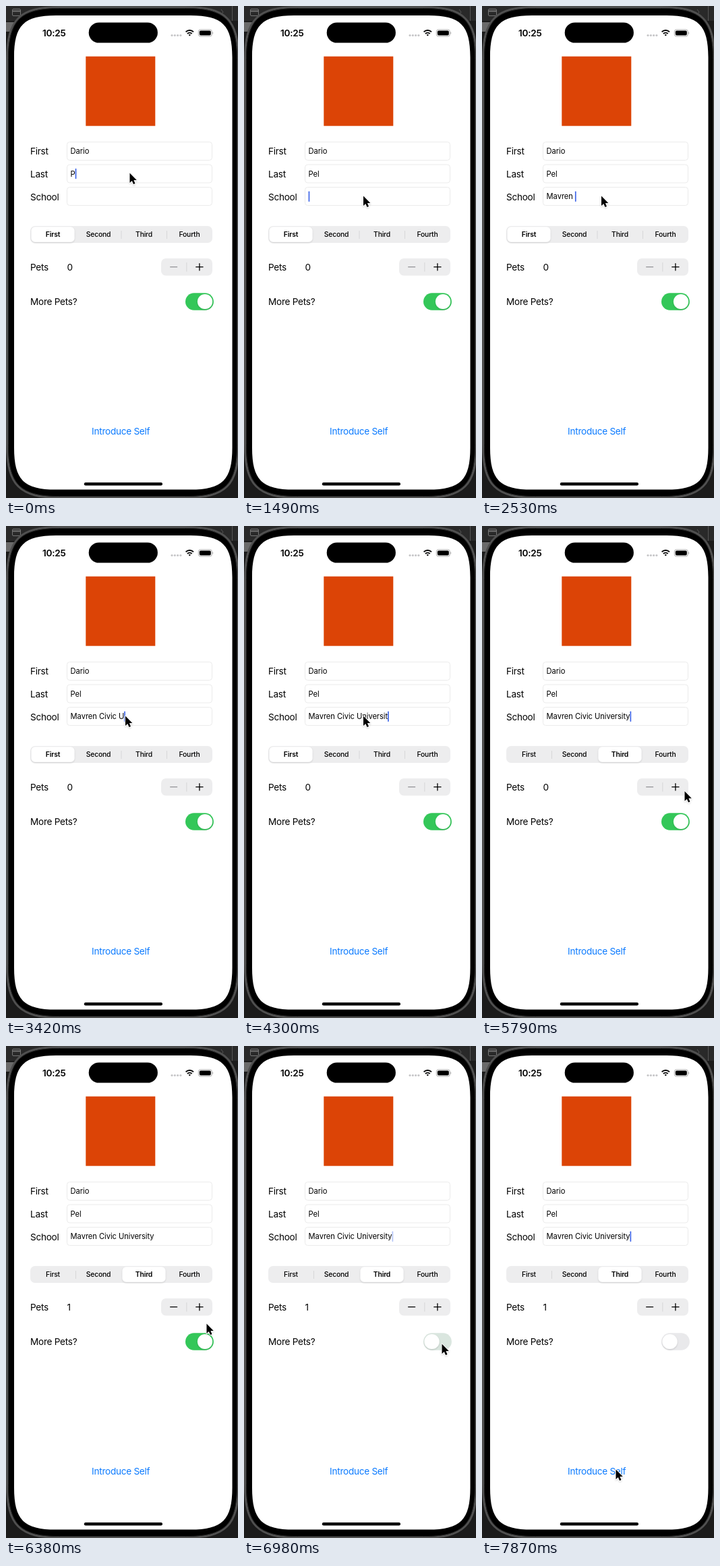
An HTML page for the animation above (8000 ms loop, 344 by 729 pixels).

```html
<!DOCTYPE html>
<html lang="en">
<head>
<meta charset="utf-8">
<title>Form demo</title>
<style>
html, body { margin: 0; width: 100%; height: 100%; overflow: hidden; background: #1b1b1b; }
svg { display: block; font-family: Inter, Roboto, sans-serif; }
text { white-space: pre; letter-spacing: -.02em; fill: #000; }
.label { font-size: 13.6px; }
.field { font-size: 11.15px; letter-spacing: -.004em; }
.seg { font-size: 10.4px; font-weight: 500; text-anchor: middle; }
.seg.on { font-weight: 600; }
.box { fill: #fff; stroke: #ebebeb; stroke-width: 1; }
.tray { fill: #ededee; }
.rule { stroke: #d6d6d8; stroke-width: 1; }
.sign { stroke: #000; stroke-width: 1.3; stroke-linecap: round; }
</style>
</head>
<body>
<svg width="344" height="729" viewBox="0 0 344 729">
  <defs>
    <filter id="soft" x="-30%" y="-30%" width="160%" height="180%">
      <feDropShadow dx="0" dy="1.2" stdDeviation="1.3" flood-opacity=".16"/>
    </filter>
  </defs>

  <!-- desktop behind the phone -->
  <rect width="344" height="729" fill="#1b1b1b"/>
  <rect width="344" height="22" fill="#292929"/>
  <rect y="24" width="12" height="14" fill="#6a6a6a"/>
  <g fill="none" stroke="#757575">
    <rect x="9.5" y="4.5" width="12" height="10" rx="1.5"/>
    <path d="M9.5 7.5H21.5" stroke-width="2"/>
    <path d="M319 5l3 4-3 4M335.5 0V22" stroke="#555"/>
  </g>

  <!-- phone -->
  <path id="body" fill="#000" stroke="#505050" stroke-width="3"/>
  <path id="rim" fill="none" stroke="#242424"/>
  <path id="screen" fill="#fff"/>
  <rect x="122.7" y="24.4" width="102.2" height="30.2" rx="15.1"/>
  <rect x="115.8" y="705.9" width="116.2" height="4.5" rx="2.2"/>

  <!-- status bar -->
  <text x="54" y="45" font-size="13.6" font-weight="600">10:25</text>
  <g fill="#c6c6c8">
    <circle cx="246" cy="43.5" r="1.6"/><circle cx="250.3" cy="43.5" r="1.6"/>
    <circle cx="254.6" cy="43.5" r="1.6"/><circle cx="258.9" cy="43.5" r="1.6"/>
  </g>
  <g fill="none" stroke="#000" stroke-width="1.9">
    <path d="M266.6 38.4a8 8 0 0 1 11.4 0M268.9 41a4.8 4.8 0 0 1 6.8 0"/>
    <path d="M270.6 42.8a2.5 2.5 0 0 1 3.4 0L272.3 44.6Z" fill="#000" stroke="none"/>
  </g>
  <rect x="285.3" y="35" width="20" height="10" rx="3" fill="none" stroke="#a5a5a5" stroke-width=".9"/>
  <rect x="286.8" y="36.5" width="17" height="7" rx="1.8"/>
  <path d="M306.3 38.5a1.6 1.6 0 0 1 0 3Z" fill="#a5a5a5"/>

  <rect x="118.3" y="74.7" width="103" height="103" fill="#dc4406"/>

  <!-- fields -->
  <g class="label">
    <text x="36" y="220">First</text>
    <text x="36" y="253.8">Last</text>
    <text x="36" y="287.5">School</text>
    <text x="36" y="392">Pets</text>
    <text x="90.4" y="392" id="count">0</text>
    <text x="36" y="443">More Pets?</text>
  </g>
  <rect class="box" x="90.5" y="201.5" width="215" height="27" rx="4"/>
  <rect class="box" x="90.5" y="235" width="215" height="27" rx="4"/>
  <rect class="box" x="90.5" y="268.5" width="215" height="27" rx="4"/>
  <text class="field" x="95.6" y="219">Dario</text>
  <text class="field" x="95.6" y="252.5" id="last"></text>
  <text class="field" x="95.6" y="286.3" id="school"></text>
  <rect id="caret" width="1.7" height="15.5" rx=".8" fill="#3f66e8"/>

  <!-- segments -->
  <rect class="tray" x="36" y="326" width="270" height="25" rx="7"/>
  <g id="rules"></g>
  <rect id="thumb" y="327.3" width="64" height="22.4" rx="5.8" fill="#fff" filter="url(#soft)"/>
  <g id="segs"></g>

  <!-- stepper -->
  <rect class="tray" x="230" y="374" width="76" height="25.5" rx="7"/>
  <path class="rule" d="M267.8 380V393.5"/>
  <path class="sign" id="minus" d="M243.7 386.7H253.6"/>
  <path class="sign" d="M281.8 386.7H292M286.9 381.6V391.8"/>

  <!-- switch -->
  <rect id="track" x="266" y="425.3" width="41.9" height="25.5" rx="12.75"/>
  <circle id="knob" cy="438" r="11.1" fill="#fff" filter="url(#soft)"/>

  <text class="label" id="button" x="170.2" y="635" text-anchor="middle" style="fill:#0a7aff">Introduce Self</text>

  <path id="mouse" d="M0 0V14.6L3.3 11.5L5.5 16.6L8 15.6L5.9 10.6H10.3Z"
    stroke="#fff" stroke-width="1.7" stroke-linejoin="round" paint-order="stroke" filter="url(#soft)"/>
</svg>
<script>
const LOOP = 8000, TICK = 148.2, STEP = 148.5;
const LEFT = 95.6, PITCH = 67.5;
const SURNAME = 'Pel', SCHOOL = 'Mavren Civic University';
const SEGMENTS = ['First', 'Second', 'Third', 'Fourth'];
const SVG = 'http://www.w3.org/2000/svg';
const $ = id => document.getElementById(id);

// [time, x, y] of the pointer tip
const POINTER = [
  [0, 183.5, 247.5], [850, 183.5, 247.5], [1320, 177, 281.5], [4600, 177, 281.5],
  [5040, 202, 332.5], [5250, 202, 332.5], [5740, 300.5, 393], [6080, 300.5, 393],
  [6780, 293, 438.5], [6970, 293.5, 441.5], [7080, 293.5, 441.5], [7680, 198.5, 627.5], [LOOP, 198.5, 627.5]
];

// bursts of typing: [start, end, characters before, characters after]
const BURSTS = [[1792, 2970, 0, 11], [2970, 3415, 11, 14], [3564, 4455, 14, 23]];
const TYPED = 4455, FOCUS = 1400;

const ramp = (t, a, b) => Math.min(1, Math.max(0, (t - a) / (b - a)));
const ease = (t, a, b) => { const p = ramp(t, a, b); return p * p * (3 - 2 * p); };
const mix = (a, b, p) => a + (b - a) * p;

function set(el, attrs) {
  for (const k in attrs) el.setAttribute(k, attrs[k]);
}

function add(parent, tag, attrs) {
  const el = document.createElementNS(SVG, tag);
  set(el, attrs);
  return $(parent).appendChild(el);
}

// box with continuous corners of nominal radius r
function squircle(x, y, w, h, r) {
  const a = r * 1.38, c = r * .321;
  return `M${x + a} ${y}h${w - 2 * a}c${a - c} 0 ${a} ${c} ${a} ${a}` +
    `v${h - 2 * a}c0 ${a - c} ${-c} ${a} ${-a} ${a}` +
    `h${2 * a - w}c${c - a} 0 ${-a} ${-c} ${-a} ${-a}` +
    `v${2 * a - h}c0 ${c - a} ${c} ${-a} ${a} ${-a}Z`;
}

set($('body'), { d: squircle(1.5, 1.5, 343, 727, 57) });
set($('rim'), { d: squircle(3.5, 3.5, 339, 723, 55) });
set($('screen'), { d: squircle(12, 14, 323.5, 702.5, 45) });

const rules = [1, 2, 3].map(i => add('rules', 'path', { class: 'rule', d: `M${36 + i * PITCH} 333V345` }));
const segs = SEGMENTS.map((name, i) => {
  const el = add('segs', 'text', { class: 'seg', x: 69.5 + i * PITCH, y: 342.2 });
  el.textContent = name;
  return el;
});

function pointerAt(t) {
  const i = Math.max(1, POINTER.findIndex(k => k[0] >= t));
  const [a, b] = [POINTER[i - 1], POINTER[i]];
  const p = ease(t, a[0], b[0]);
  return [mix(a[1], b[1], p), mix(a[2], b[2], p)];
}

function typedAt(t) {
  let n = 0;
  for (const [a, b, from, to] of BURSTS) if (t >= a) n = Math.round(mix(from, to, ramp(t, a, b)));
  return n;
}

// the caret blinks once a second, and stays lit while keys are pressed
function caretAlpha(t) {
  if (t > FOCUS && t < TYPED) return 1;
  const p = (t < FOCUS ? t : t - TYPED) % 1000;
  return p < 500 ? 1 : p < 900 ? 1 - ramp(p, 500, 540) : ramp(p, 940, 1000);
}

function drawFields(t) {
  $('last').textContent = t < 140 ? SURNAME[0] : SURNAME;
  $('school').textContent = SCHOOL.slice(0, typedAt(t));
  const inLast = t < FOCUS, field = $(inLast ? 'last' : 'school');
  const width = field.textContent ? field.getComputedTextLength() : 0;
  set($('caret'), { x: LEFT + width, y: inLast ? 240.7 : 274.5, opacity: caretAlpha(t) });
}

function drawControls(t) {
  const pos = 2 * ease(t, 5120, 5480), chosen = Math.round(pos);
  set($('thumb'), { x: 37.5 + pos * PITCH });
  segs.forEach((el, i) => el.classList.toggle('on', i === chosen));
  rules.forEach((el, i) => set(el, { opacity: i === chosen || i === chosen - 1 ? 0 : 1 }));

  const added = t >= 6070;
  $('count').textContent = added ? 1 : 0;
  $('minus').style.stroke = added ? '#000' : '#929296';

  const tint = ramp(t, 6770, 6998);
  const rgb = [[52, 233], [199, 233], [89, 235]].map(([a, b]) => Math.round(mix(a, b, tint)));
  set($('track'), { fill: `rgb(${rgb})` });
  set($('knob'), { cx: mix(295, 278.5, ease(t, 6770, 6975)) });
  set($('button'), { opacity: t > 7650 && t < 7800 ? .45 : 1 });
}

function draw(t) {
  drawFields(t);
  drawControls(t);
  set($('mouse'), { transform: `translate(${pointerAt(t)})` });
}

const start = performance.now();
function frame() {
  const t = (performance.now() - start) % LOOP;
  draw(Math.floor(t / TICK) * STEP);
  requestAnimationFrame(frame);
}
frame();
</script>
</body>
</html>
```
